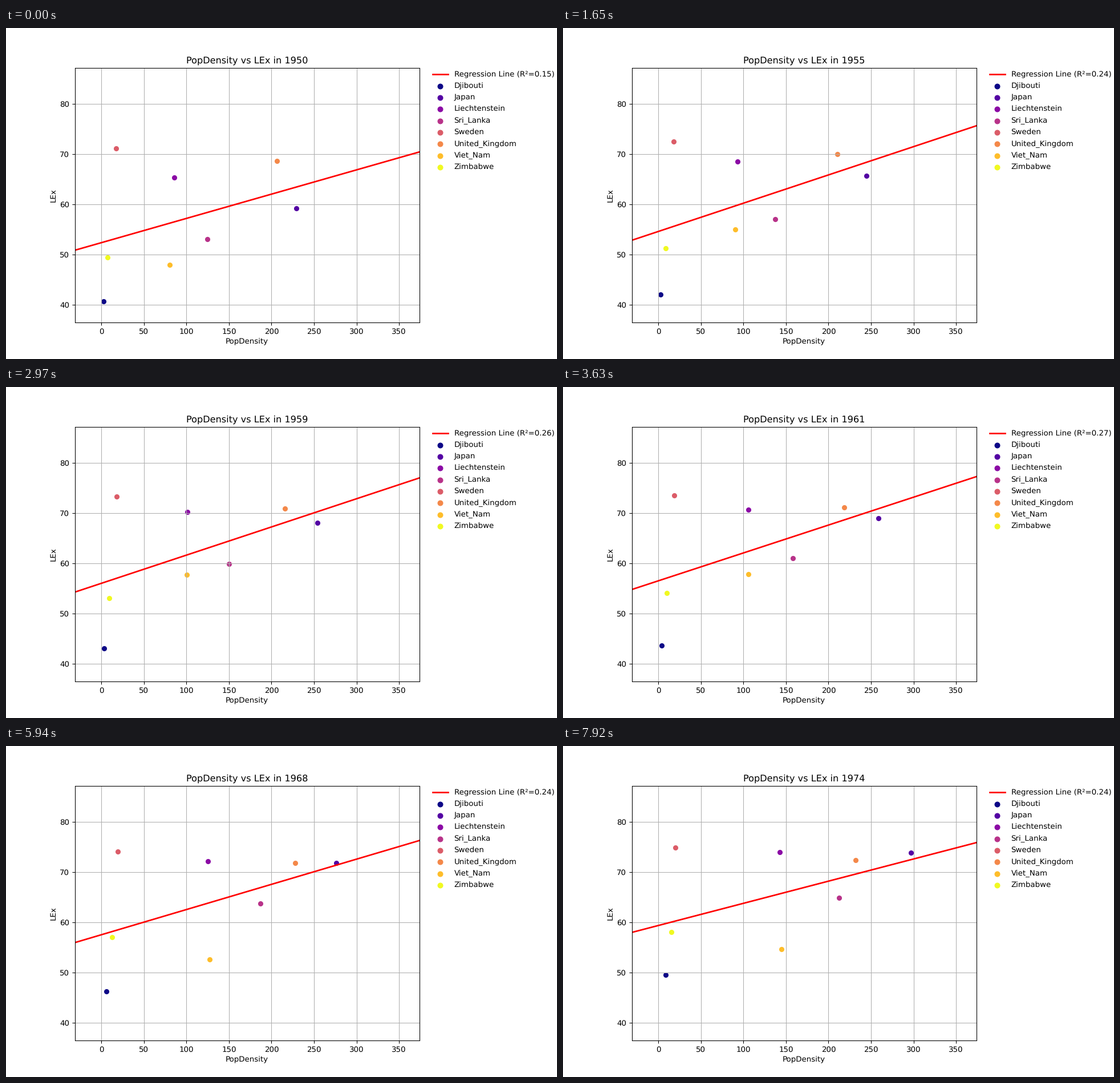
A matplotlib script for the animation above (8 s loop, 966 px wide and 580 px high).

```python
import numpy as np
import matplotlib.pyplot as plt
from matplotlib.animation import FuncAnimation

STEP, LOOP, TICK = 330, 8000, 40   # ms per year, per loop, per drawn frame
START, YEARS = 1950, 25
XLIM = (-31.1, 373.7)
YLIM = (36.46, 87.21)

t = np.arange(YEARS)
u = t / (YEARS - 1)


def path(start, end, arc=0, wave=0, ease=1):
    """Eased run from start to end, bent by a half and a full sine."""
    return (start + (end - start) * u ** ease
            + arc * np.sin(np.pi * u) + wave * np.sin(2 * np.pi * u))


# density and life expectancy over the years
DATA = {
    "Djibouti": (path(2.7, 8.4, -1.6), path(40.7, 49.5, -1.15, 0.2)),
    "Japan": (path(229.4, 297.1, -2.3, 2.3), path(59.2, 73.9, ease=0.52)),
    "Liechtenstein": (path(85.9, 142.4, -5.6, -1.1), path(65.3, 74, 1.3, 0.6)),
    "Sri_Lanka": (path(124.4, 212.2, -6.4, -1.5), path(53.1, 64.9, 2.5)),
    "Sweden": (path(17.2, 20.2), path(71.1, 74.9, 0.6, 0.3)),
    "United_Kingdom": (path(206.6, 231.6, 0.8, -1.7),
                       path(68.6, 72.35, 0.8, 0.2)),
    "Viet_Nam": (path(80.2, 144.9, -3.6, -0.9),
                 path(48, 54.7, 6.4, 1.8) - 3.1 * np.exp(-(t - 18) ** 2 / 2)),
    "Zimbabwe": (path(7.4, 15.3, -0.9), path(49.4, 58.1, 0.85, -0.5)),
}
xs = np.array([density for density, _ in DATA.values()])
ys = np.array([life for _, life in DATA.values()])
colors = plt.cm.plasma(np.linspace(0, 1, len(DATA)))

plt.rcParams["text.hinting"] = "none"
fig, ax = plt.subplots(figsize=(10, 6.0042), dpi=96.6)
fig.subplots_adjust(left=0.125, right=0.75, bottom=0.11, top=0.88)
ax.set(xlim=XLIM, ylim=YLIM, xlabel="PopDensity", ylabel="LEx")
ax.grid(True)
title = ax.set_title("")

line, = ax.plot([], [], color="red", lw=2, label="Regression Line")
dots = [ax.scatter([0], [0], s=46, color=[c], linewidths=0) for c in colors]
keys = [ax.scatter([], [], s=42, color=[c], label=name)
        for name, c in zip(DATA, colors)]
legend = ax.legend(handles=[line] + keys, loc="upper left", frameon=False,
                   bbox_to_anchor=(1.03, 0.999), borderaxespad=0,
                   labelspacing=0.567)
fit_label = legend.get_texts()[0]


def update(frame):
    i = min((frame * TICK + TICK - 1) // STEP, YEARS - 1)
    x, y = xs[:, i], ys[:, i]
    for dot, point in zip(dots, zip(x, y)):
        dot.set_offsets([point])
    slope, base = np.polyfit(x, y, 1)
    ends = np.array(XLIM)
    line.set_data(ends, slope * ends + base)
    r2 = np.corrcoef(x, y)[0, 1] ** 2
    title.set_text(f"PopDensity vs LEx in {START + i}")
    fit_label.set_text(f"Regression Line (R²={r2:.2f})")
    return [*dots, line, title, fit_label]


anim = FuncAnimation(fig, update, frames=LOOP // TICK, interval=TICK,
                     init_func=lambda: update(0), repeat=True, repeat_delay=0)
plt.show()
```
